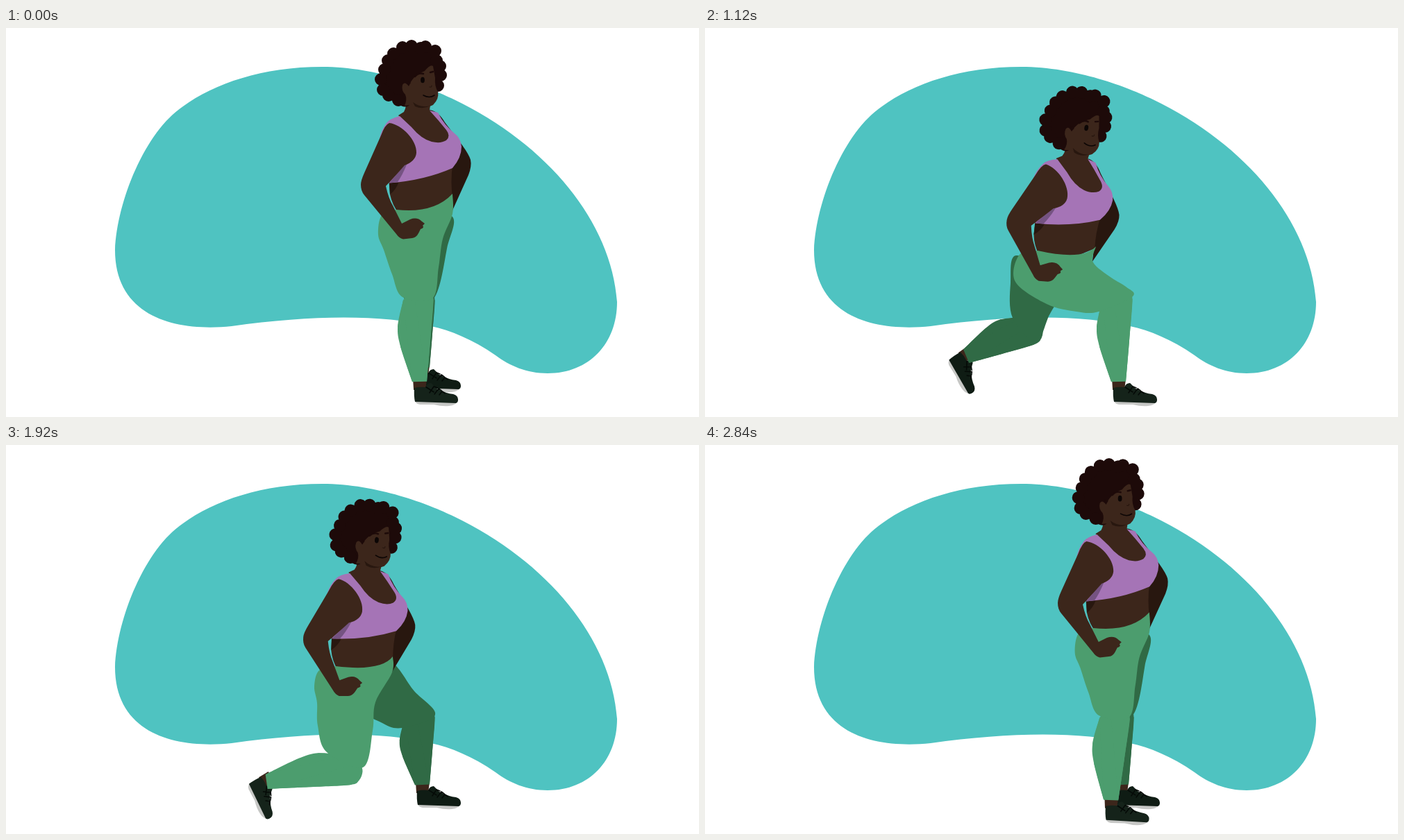
Animation, 998 px wide and 561 px high, one loop 2.88 s. Source, as an HTML page with a canvas:

```html
<!DOCTYPE html>
<html lang="en">
<head>
<meta charset="utf-8">
<title>Lunges</title>
<style>
  html, body { margin: 0; width: 100%; height: 100%; overflow: hidden; background: #fff; }
  canvas { display: block; width: 100vw; height: 100vh; }
</style>
</head>
<body>
<canvas id="stage"></canvas>
<script>
const W = 998, H = 561, LOOP = 2880, HALF = LOOP / 2, STEP = 40;
const canvas = document.getElementById('stage');
const ctx = canvas.getContext('2d');
const dpr = window.devicePixelRatio || 1;
canvas.width = W * dpr;
canvas.height = H * dpr;

const C = {
  blob: '#4fc3c1', skin: '#3c261b', skinDark: '#28170f', hair: '#1d0a09', ink: '#0c0605',
  bra: '#a574b6', braDark: '#755382', pants: '#4c9d6e', pantsDark: '#306a45',
  shoe: '#15231a', shoeDark: '#0f1c14', sole: '#c6c7c5'
};

// Poses. body: hand x, y, lean. hips: waist front, down the front, knee, up the back,
// waist back, waistband control. thigh: far thigh outline. near/far: knee x, y, shin angle, foot angle.
const stand = {
  body: [602, 283, 0],
  hips: [643,239, 643,268, 629,304, 623,345, 614,390, 571,388, 556,355, 544,320, 536,298, 541,270, 562,262, 616,268],
  thigh: [640,270, 635,318, 616,390, 575,392, 570,340, 560,280],
  near: [594, 392, 89, 0],
  far: [596, 394, 87.6, 0]
};
const midA = {
  body: [514, 349, 10.3],
  hips: [563,315, 559,338, 585,360, 606,373, 616,387, 567,409, 535,409, 492,398, 447,366, 452,328, 479,321, 545,336],
  thigh: [510,370, 494,418, 476,452, 443,418, 440,368, 449,328],
  near: [594, 392, 89, 0],
  far: [465, 437, 157.5, 58]
};
const lowA = {
  body: [486, 372, 14.3],
  hips: [537,340, 535,352, 575,362, 605,373, 616,386, 565,424, 520,435, 454,415, 418,383, 427,348, 453,343, 522,358],
  thigh: [490,400, 466,443, 438,486, 405,447, 405,405, 415,368],
  near: [595, 392, 89, 0],
  far: [424, 477, 179.5, 74]
};
const midB = {
  body: [512, 344, 6.6],
  hips: [557,305, 556,328, 532,371, 528,412, 514,465, 462,443, 449,405, 448,372, 444,348, 451,325, 475,319, 540,327],
  thigh: [548,312, 588,355, 618,389, 571,408, 540,400, 500,370],
  near: [492, 469, 171.7, 62],
  far: [596, 394, 87.6, 0]
};
const lowB = {
  body: [475, 367, 9.3],
  hips: [522,331, 521,352, 494,396, 490,435, 475,495, 418,467, 407,430, 412,396, 407,370, 415,348, 440,341, 506,353],
  thigh: [515,335, 572,362, 619,385, 570,420, 518,423, 480,402],
  near: [452, 502, 184.4, 74],
  far: [598, 394, 88, 0]
};

const flat = p => [p.body, p.hips, p.thigh, p.near, p.far].flat();

// Halfway pose in which the swinging foot stays close to the floor.
function halfway(mid, swing) {
  const blend = {};
  for (const k in stand) blend[k] = stand[k].map((v, i) => (v + mid[k][i]) / 2);
  return flat({ ...blend, ...swing });
}
const lunges = [
  { at: [0, .36, .725, 1], poses: [flat(stand), halfway(midA, { far: [533, 415, 136, 20] }), flat(midA), flat(lowA)] },
  { at: [0, .35, .7, 1], poses: [flat(stand), halfway(midB, { near: [542, 424, 137, 20] }), flat(midB), flat(lowB)] }
];

// Depth of a lunge over its half of the loop.
const times = [0, 240, 480, 560, 680, 760, 1000, 1120, 1360, 1400, 1440];
const depths = [0, .115, .7, .92, .995, 1, .985, .725, .115, .025, 0];

// Monotone cubic through (xs, ys); endSlope scales the slope at both ends.
function curve(xs, ys, x, endSlope) {
  const n = xs.length - 1;
  const secant = i => (ys[i + 1] - ys[i]) / (xs[i + 1] - xs[i]);
  const slope = i => {
    if (i === 0) return secant(0) * endSlope;
    if (i === n) return secant(n - 1) * endSlope;
    const a = secant(i - 1), b = secant(i);
    return a * b <= 0 ? 0 : 2 * a * b / (a + b);
  };
  let i = 0;
  while (i < n - 1 && x > xs[i + 1]) i++;
  const d = xs[i + 1] - xs[i], u = (x - xs[i]) / d, v = 1 - u;
  return ys[i] * (1 + 2 * u) * v * v + ys[i + 1] * u * u * (3 - 2 * u)
    + d * (slope(i) * u * v * v - slope(i + 1) * u * u * v);
}

function poseAt(t) {
  const { at, poses } = lunges[t < HALF ? 0 : 1];
  const depth = curve(times, depths, t % HALF, 0);
  const v = poses[0].map((_, i) => curve(at, poses.map(p => p[i]), depth, 1));
  return {
    body: v.slice(0, 3), hips: v.slice(3, 27), thigh: v.slice(27, 39),
    near: v.slice(39, 43), far: v.slice(43, 47)
  };
}

function fill(path, color) {
  ctx.fillStyle = color;
  ctx.fill(path);
}

function stroke(path, color, width) {
  ctx.strokeStyle = color;
  ctx.lineWidth = width;
  ctx.lineCap = ctx.lineJoin = 'round';
  ctx.stroke(path);
}

function spline(xy, closed) {
  const n = xy.length / 2, path = new Path2D();
  const pt = i => {
    i = closed ? (i + n) % n : Math.max(0, Math.min(n - 1, i));
    return [xy[2 * i], xy[2 * i + 1]];
  };
  path.moveTo(...pt(0));
  for (let i = 0; i < (closed ? n : n - 1); i++) {
    const [a, b, c, d] = [pt(i - 1), pt(i), pt(i + 1), pt(i + 2)];
    path.bezierCurveTo(b[0] + (c[0] - a[0]) / 6, b[1] + (c[1] - a[1]) / 6,
      c[0] - (d[0] - b[0]) / 6, c[1] - (d[1] - b[1]) / 6, c[0], c[1]);
  }
  return path;
}

const shape = d => new Path2D(d);
const blob = shape('M157 320C160 250 200 150 255 113C300 80 370 56 455 56C535 56 610 86 645 103' +
  'C780 168 872 280 880 395C880 455 840 498 780 498C750 498 725 487 705 472' +
  'C672 449 640 436 612 430C540 413 440 414 325 430C250 438 157 420 157 320Z');
const farArm = shape('M609 118Q622 119 632 136L657 169Q667 183 669 190Q671 199 666 212L643 263L639 205Z');
const belly = shape('M551 215L553 240Q556 255 566 268L600 272L643 244Q640 222 643 198Z');
const bellyShade = shape('M552 223L566 221Q562 233 553 240Z');
const chest = shape('M565 126L573 121Q577 114 576 104L612 104L610 119L641 150L638 167L600 169Z');
const bra = shape('M567 127Q552 131 548 137Q540 148 538 160L560 200L552 223.500Q602 220 643 202' +
  'Q656 187 656 171Q655 159 646 152Q631 140 622 122L610 119Q622 132 634 147Q641 156 634 162' +
  'Q626 167 613 164Q598 160 584 143Z');
const braShade = shape('M575 196L552 223.500L564 222Q571 212 577 197Z');
const nearArm = shape('M552 137C570 139 592 162 591 180Q590 192 574 198Q562 212 547 228Q551 246 557 256' +
  'L570 282L582 276Q592 272 599 279L603 282L600 285Q603 288 597 290L594 296Q591 302 585 303' +
  'L572 304.500Q566 303 562 297L516 241Q511 235 511 226Q511 220 516 209L540 155Q546 139 552 137Z');
const neckShade = shape('M586 107Q598 116 611 112Q600 118 589 113Z');
const face = shape('M580 84Q586 68 603 62Q611 52 615 55L618 72Q617 84 622 92Q624 102 615 111' +
  'Q605 117 592 110L574 112Q578 103 575 96Q569 90 571 82Q574 76 580 84Z');
const hairBase = spline([585,24, 612,30, 625,50, 627,74, 618,88, 600,80, 580,112, 560,107, 541,92, 538,73, 547,48, 563,30], true);
const curls = [[584,26], [571,28], [597,29], [604,27], [618,33], [620,47], [625,55], [626,68], [622,83], [558,37],
  [550,47], [545,60], [540,74], [543,89], [551,97], [565,104]];
const brow = shape('M589 70Q594 64 601 66M611 64L615 63');
const nose = shape('M610 85Q613 86 613 83');
const smile = shape('M601 97Q610 102 617 97');
const wisp = shape('M577 76L583 79L580 83Z');

const ankle = shape('M-10 -4L10 -4L8 12L-9 12Z');
const upper = shape('M-8 9Q0 7 8 8Q10 2 16 2L24 10Q38 17 48 18Q55 20 55 26Q55 30 52 31L-7 29Q-9 20 -8 9Z');
const sole = shape('M-8 24Q-8 32 0 33L20 33Q32 36 42 35Q52 34 54 28Z');
const laces = shape('M9 8L20 15M14 16L20 7L25 9M21 18L27 10L31 13M28 19L32 14L36 17');

function drawFoot(x, y, angle, color) {
  const k = angle / 74;
  ctx.save();
  ctx.translate(x + 4 * k, y - 6 * k);
  ctx.rotate(angle * Math.PI / 180);
  ctx.scale(1 - .08 * k, 1);
  fill(ankle, C.skin);
  fill(sole, C.sole);
  fill(upper, color);
  stroke(laces, '#050a07', 1.6);
  ctx.restore();
}

// Lower leg along the bone from the knee; side offsets are positive towards the front.
function drawShin([x, y, angle, footAngle], length, color, shoe) {
  const a = angle * Math.PI / 180, c = Math.cos(a), s = Math.sin(a);
  const at = (u, v) => [x + c * u + s * v, y + s * u - c * v];
  drawFoot(...at(length, 0), footAngle, shoe);
  const front = [[-20, -8], [-21, 5], [-14, 17], [0, 21.5], [length * .5, 16], [length, 10]];
  const back = [[length, -11], [length * .57, -27], [length * .32, -30.5], [0, -22]];
  const path = spline(front.flatMap(p => at(...p)), false);
  const rear = spline(back.flatMap(p => at(...p)), false);
  const whole = new Path2D();
  whole.addPath(path);
  whole.addPath(rear);
  const link = new Path2D();
  [front[0], front[2], front[3], front[4], front[5], ...back].forEach((p, i) => link[i ? 'lineTo' : 'moveTo'](...at(...p)));
  link.closePath();
  fill(link, color);
  fill(whole, color);
}

function drawHips(p) {
  const path = spline(p.slice(0, 22), false);
  path.quadraticCurveTo(p[22], p[23], p[0], p[1]);
  fill(path, C.pants);
}

function withBody([x, y, lean], draw) {
  ctx.save();
  ctx.translate(x, y);
  ctx.rotate(lean * Math.PI / 180);
  ctx.translate(-602, -283);
  draw();
  ctx.restore();
}

function drawHead() {
  const puffs = new Path2D();
  for (const [x, y] of curls) {
    puffs.moveTo(x + 9, y);
    puffs.arc(x, y, 9, 0, Math.PI * 2);
  }
  fill(hairBase, C.hair);
  fill(puffs, C.hair);
  fill(face, C.skin);
  fill(neckShade, C.skinDark);
  fill(wisp, C.hair);
  stroke(brow, C.hair, 2.4);
  stroke(nose, C.skinDark, 1.2);
  stroke(smile, C.ink, 1.6);
  const eye = new Path2D();
  eye.ellipse(600, 75, 2.9, 4.3, 0, 0, Math.PI * 2);
  fill(eye, C.ink);
}

function draw(t) {
  const pose = poseAt(t);
  ctx.setTransform(dpr, 0, 0, dpr, 0, 0);
  ctx.fillStyle = '#fff';
  ctx.fillRect(0, 0, W, H);
  fill(blob, C.blob);

  drawShin(pose.far, 96, C.pantsDark, C.shoeDark);
  fill(spline(pose.thigh, true), C.pantsDark);
  withBody(pose.body, () => {
    fill(farArm, C.skinDark);
    fill(belly, C.skin);
    fill(bellyShade, C.skinDark);
  });
  drawShin(pose.near, 118, C.pants, C.shoe);
  drawHips(pose.hips);
  withBody(pose.body, () => {
    fill(chest, C.skin);
    fill(bra, C.bra);
    fill(braShade, C.braDark);
    fill(nearArm, C.skin);
    drawHead();
  });
}

function tick() {
  const t = performance.now() % LOOP;
  draw(Math.floor(t / STEP) * STEP);
  requestAnimationFrame(tick);
}
tick();
</script>
</body>
</html>
```
